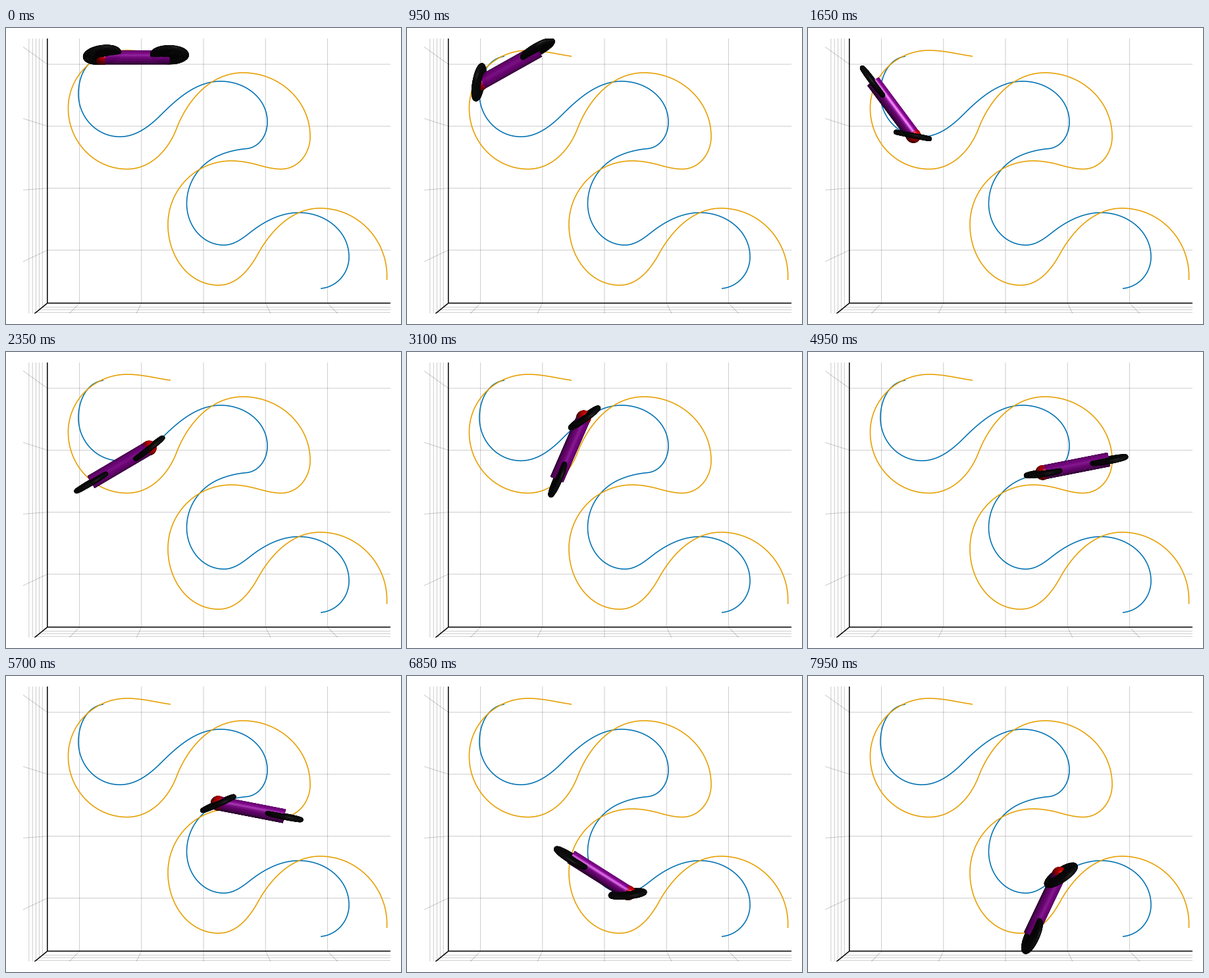
A matplotlib script for the animation above (8 s loop, 600 by 450 pixels).

```python
import numpy as np
import matplotlib.pyplot as plt
from matplotlib.animation import FuncAnimation
from matplotlib.collections import LineCollection, PolyCollection
from matplotlib.patches import Rectangle

W, H, FRAMES, STEP = 600, 450, 160, 50
CENTRE = np.array([300.0, 225.0])
CAMERA = 2500.0                    # camera height above the floor, in floor pixels
WHEELBASE, AXLE, DROP = 101.0, 29.0, 9.0
PX = 0.72                          # one pixel in points

# Turning points of each track: x, y, direction (degrees), passing time (s)
FRONT = [(148, 43, 172, 0), (110, 100, 90, 1.09), (173, 165.3, 0, 1.74),
         (236, 131.5, -45, 2.64), (326, 81, 0, 3.51), (397, 143, 90, 3.95),
         (365, 183.5, 175, 4.75), (322, 194.3, 156, 5.7),
         (274.5, 267, 90, 6.28), (331, 330, 0, 6.82), (372, 310, -38, 7.69),
         (445, 280.7, 0, 8.7), (521, 348, 90, 9.2), (478, 396, 175, 10)]
REAR = [(250, 43, 188, 0), (184, 34, 180, 1.08), (94.5, 122, 90, 1.85),
        (184, 214.5, 0, 2.69), (259, 153, -69, 3.49), (360, 68, 0, 4.07),
        (462, 165, 90, 4.96), (418, 214.5, 180, 5.75), (380, 207.5, 195, 6.05),
        (342, 202, 180, 6.25), (246, 299, 90, 6.97), (323, 391, 0, 7.79),
        (383, 343, -61, 8.45), (477, 274, 0, 9.2), (578.5, 383, 93, 10)]
LEAN = [(0, 21), (1.65, 2), (3.1, 9), (4.25, -4), (5.7, -4), (6.85, 8), (7.95, 15)]


def reach(a, b):
    """Hobby's handle length for the angles at both ends of a chord."""
    bend = ((np.sin(a) - np.sin(b) / 16) * (np.sin(b) - np.sin(a) / 16)
            * (np.cos(a) - np.cos(b)))
    return ((2 + 2**.5 * bend)
            / (3 + 1.5 * (5**.5 - 1) * np.cos(a) + 1.5 * (3 - 5**.5) * np.cos(b)))


def track(knots, n=150):
    """Smooth curve through the knots, as complex points."""
    v = np.arange(n) / n
    out = []
    for (x0, y0, d0, _), (x1, y1, d1, _) in zip(knots, knots[1:]):
        p, q = complex(x0, y0), complex(x1, y1)
        chord = q - p
        a = np.radians(d0) - np.angle(chord)
        b = np.angle(chord) - np.radians(d1)
        c0 = p + np.exp(1j * a) * chord * reach(a, b)
        c1 = q - np.exp(-1j * b) * chord * reach(b, a)
        out.append((1 - v)**3 * p + 3 * v * (1 - v)**2 * c0
                   + 3 * v * v * (1 - v) * c1 + v**3 * q)
    return np.append(np.concatenate(out), q)


def ease(keys, values, x):
    """Smooth interpolation with parabolic slopes at the keys."""
    k, y = np.array(keys, float), np.array(values, float)
    h = np.diff(k)
    s = np.diff(y) / h
    inner = (h[1:] * s[:-1] + h[:-1] * s[1:]) / (h[1:] + h[:-1])
    d = np.r_[s[0] / 2, inner, s[-1]]
    i = np.clip(np.searchsorted(k, x, side="right") - 1, 0, len(h) - 1)
    v = (x - k[i]) / h[i]
    return (y[i] * (1 + 2 * v) * (1 - v)**2 + y[i + 1] * v * v * (3 - 2 * v)
            + h[i] * v * (1 - v) * (d[i] * (1 - v) - d[i + 1] * v))


def ride(curve, knots, t):
    """Position and direction along the track at the given times."""
    s = np.r_[0, np.cumsum(np.abs(np.diff(curve)))]
    now = ease([k[3] for k in knots], s[::len(curve) // (len(knots) - 1)], t)
    step = np.interp(now + 2, s, curve) - np.interp(now - 2, s, curve)
    return np.interp(now, s, curve), step / np.abs(step)


def xy(z):
    return np.column_stack([z.real, z.imag])


def revolve(along, radius, n):
    """Quads of a surface of revolution around the first axis."""
    along, radius = np.array(along, float), np.array(radius, float)
    ang = np.linspace(0, 2 * np.pi, n + 1)
    grid = np.stack([np.repeat(along[:, None], n + 1, 1),
                     radius[:, None] * np.cos(ang),
                     radius[:, None] * np.sin(ang)], -1)
    quads = np.stack([grid[:-1, :-1], grid[1:, :-1],
                      grid[1:, 1:], grid[:-1, 1:]], 2)
    return quads.reshape(-1, 4, 3)


def wheel_mesh(rim=25.6, half=3.3):
    turn = np.linspace(-np.pi / 2, np.pi / 2, 8)
    flat = np.linspace(0, rim, 6)[:-1]
    along = np.r_[np.full(5, -half), half * np.sin(turn), np.full(5, half)]
    radius = np.r_[flat, rim + half * np.cos(turn), flat[::-1]]
    return revolve(along, radius, 56)


def tube_mesh(r=10.4):
    along = np.r_[0, 0, np.linspace(0, WHEELBASE, 32), WHEELBASE]
    radius = np.r_[0, r / 2, np.full(32, r), 0]
    return revolve(along - WHEELBASE / 2, radius, 40)


def ball_mesh(r=11):
    a = np.linspace(0, np.pi, 17)
    return revolve(-r * np.cos(a), r * np.sin(a), 28)


LIGHT = np.array([.51, -.38, .775])
LIGHT /= np.linalg.norm(LIGHT)


def shade(normal, base, shine):
    lit = normal @ LIGHT
    glint = np.maximum(2 * lit * normal[:, 2] - LIGHT[2], 0)**10 * (lit > 0)
    rgb = np.outer(.3 + .6 * np.maximum(lit, 0), base) + shine * glint[:, None]
    return np.clip(rgb, 0, 1)


def place(mesh, basis, centre, base, shine):
    """Visible faces of a convex body: outline, depth and colour."""
    local = mesh @ basis
    normal = np.cross(local[:, 2] - local[:, 0], local[:, 3] - local[:, 1])
    normal /= np.linalg.norm(normal, axis=1)[:, None] + 1e-9
    normal *= np.sign((normal * local.mean(1)).sum(1))[:, None]
    seen = normal[:, 2] > 0
    world = local[seen] + centre
    scale = CAMERA / (CAMERA - world[..., 2:])
    flat = CENTRE + (world[..., :2] - CENTRE) * scale
    return flat, world[..., 2].mean(1), shade(normal[seen], base, shine)


def leaning(direction, lean):
    """Rows: axle, forward and up vectors of a body leaning to its right."""
    hx, hy = direction.real, direction.imag
    c, s = np.cos(lean), np.sin(lean)
    return np.array([[-hy * c, hx * c, -s], [hx, hy, 0], [-hy * s, hx * s, c]])


times = np.arange(FRAMES) * STEP / 1000
front_curve, rear_curve = track(FRONT), track(REAR)
front, steer = ride(front_curve, FRONT, times)
rear, _ = ride(rear_curve, REAR, times)
heading = (front - rear) / np.abs(front - rear)
rear = front - WHEELBASE * heading
lean = np.radians(ease(*zip(*LEAN), times))

WHEEL, TUBE, BALL = wheel_mesh(), tube_mesh(), ball_mesh()
BLACK, PURPLE, RED = (.06, .06, .06), (.55, 0, .6), (.88, 0, 0)

fig = plt.figure(figsize=(W / 100, H / 100), dpi=100, facecolor="white")
ax = fig.add_axes([0, 0, 1, 1])
ax.set(xlim=(0, W), ylim=(H, 0))
ax.axis("off")
view = Rectangle((16, 16), 568, 418, transform=ax.transData)
wall_view = Rectangle((26, 16), 558, 418, transform=ax.transData)


def add(artist, clip=view):
    ax.add_collection(artist, autolim=False)
    artist.set_clip_path(clip)
    artist.set_snap(False)
    return artist


def out(x, y, k):
    return tuple(CENTRE + (np.array([x, y]) - CENTRE) * k)


# Floor and wall grid
LEFT, BOTTOM, TOP_K, CELL = 62.8, 418.3, 1.156, 94.2
grid = []
for x in 300 + CELL * np.arange(-2, 3):
    grid += [[(x, 0), (x, BOTTOM), out(x, BOTTOM, TOP_K)]]
for y in 243.5 + CELL * np.arange(-2, 2):
    grid += [[(W, y), (LEFT, y), out(LEFT, y, TOP_K)]]
for k in 1 / (1 - (.0306 + .0187 * np.arange(5))):
    x, y = out(LEFT, BOTTOM, k)
    grid += [[(x, 0), (x, y), (W, y)]]
add(LineCollection(grid, colors="black", alpha=.2, linewidths=PX, zorder=1),
    wall_view)
add(LineCollection([[(LEFT, 0), (LEFT, BOTTOM), (W, BOTTOM)],
                    [(LEFT, BOTTOM), out(LEFT, BOTTOM, TOP_K)]],
                   colors="black", linewidths=1.5 * PX, zorder=2))
add(LineCollection([xy(front_curve), xy(rear_curve)],
                   colors=["#0072B2", "#E69F00"], linewidths=1.6 * PX, zorder=3))
bike = add(PolyCollection([], linewidths=.4, zorder=4))


def draw(i):
    f = np.array([front[i].real, front[i].imag, AXLE])
    r = np.array([rear[i].real, rear[i].imag, AXLE])
    body = leaning(heading[i], lean[i])
    sag = -DROP * body[2]
    along = body[[1, 0, 2]]
    parts = [
        place(WHEEL, body, r, BLACK, .13),
        place(WHEEL, leaning(steer[i], lean[i]), f, BLACK, .13),
        place(TUBE, along, (f + r) / 2 + sag, PURPLE, .55),
        place(BALL, along, f + sag, RED, .4)]
    faces, depth, colour = (np.concatenate(p) for p in zip(*parts))
    order = np.argsort(depth)
    bike.set_verts(faces[order])
    bike.set_facecolor(colour[order])
    bike.set_edgecolor(colour[order])
    return bike,


anim = FuncAnimation(fig, draw, frames=FRAMES, interval=STEP, repeat=True,
                     repeat_delay=0, blit=False)
plt.show()
```
